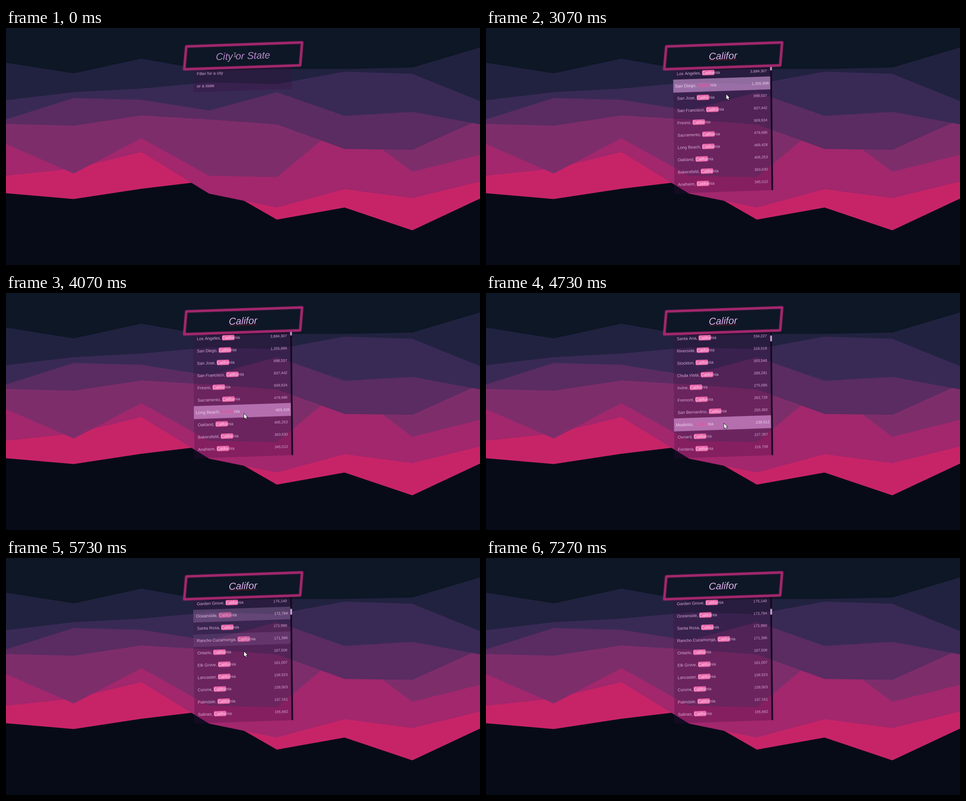
Recreate the animation shown at these times as an HTML page with a canvas. Size 1057 by 530 pixels, loop 7390 ms.

```html
<!DOCTYPE html>
<html lang="en">
<head>
<meta charset="utf-8">
<title>City search</title>
<style>
html, body { margin: 0; width: 100%; height: 100%; overflow: hidden; background: #070b18; }
canvas { display: block; }
</style>
</head>
<body>
<canvas id="stage" width="1057" height="530"></canvas>
<script>
const ctx = document.getElementById('stage').getContext('2d');
const W = 1057, LOOP = 7390, STEP = 1000 / 15;
const SANS = '"Liberation Sans", Arial, sans-serif';
const ROW = 27.5, LIST_W = 220, LIST_H = 281, SLOPE = -0.034;

const clamp = x => Math.min(1, Math.max(0, x));
const smooth = x => x * x * (3 - 2 * x);
const lerp = (a, b, k) => a + (b - a) * k;

// Lower edge of each band at equal distances, back to front
const bands = {
  '#c72467': [369, 382, 359, 341, 428, 401, 452, 381],
  '#a2276d': [330, 314, 277, 370, 401, 360, 380, 343],
  '#7e2d6b': [259, 325, 246, 330, 333, 208, 321, 283],
  '#5a2c61': [214, 218, 195, 204, 215, 270, 272, 204],
  '#392a55': [204, 156, 160, 184, 143, 196, 187, 215],
  '#212240': [161, 143, 135, 121, 125, 97, 102, 163],
  '#0d1725': [77, 101, 68, 95, 91, 91, 88, 43]
};

const others = `Chicago, Illinois|2,718,782
Jacksonville, Florida|842,583
Columbus, Ohio|822,553
Charlotte, North Carolina|792,862
Detroit, Michigan|688,701
Washington, District of Columbia|646,449
Raleigh, North Carolina|431,746`.split('\n');
const largest = `Los Angeles|3,884,307
San Diego|1,355,896
San Jose|998,537
San Francisco|837,442
Fresno|509,924
Sacramento|479,686
Long Beach|469,428
Oakland|406,253
Bakersfield|363,630
Anaheim|345,012`.split('\n');
const middle = ('Santa Ana,Riverside,Stockton,Chula Vista,Irvine,Fremont,San Bernardino,Modesto,' +
  'Oxnard,Fontana,Moreno Valley,Huntington Beach,Glendale,Santa Clarita').split(',')
  .map((name, i) => `${name}|${Math.round(334227 * 0.953 ** i).toLocaleString('en-US')}`);
const smaller = `Garden Grove|175,140
Oceanside|172,794
Santa Rosa|171,990
Rancho Cucamonga|171,386
Ontario|167,500
Elk Grove|161,007
Lancaster|159,523
Corona|159,503
Palmdale|157,161
Salinas|155,662`.split('\n');

const count = s => +s.replace(/,/g, '');
const cities = [...largest, ...middle, ...smaller]
  .map(s => s.replace('|', ', California|'))
  .concat(others)
  .map(s => s.split('|'))
  .sort((a, b) => count(b[1]) - count(a[1]));

// Matches are shown in the letter case that was typed
function search(word, total) {
  const re = new RegExp(word, 'i');
  const rows = cities.filter(c => re.test(c[0])).map(([name, pop]) => ({
    parts: name.split(new RegExp(`(${word})`, 'gi')).map((s, i) => i % 2 ? word : s), pop
  }));
  return { rows, total };
}
const hint = { rows: [{ parts: ['Filter for a city'] }, { parts: ['or a state'] }], total: 2 };
const lists = [[0, hint], [15, search('C', 480)], [20, search('Ca', 300)], [36, search('Califor', 212)]];
const keyTicks = [9, 15, 20, 22, 24, 26, 31];
const typedAt = f => 'Califor'.slice(0, keyTicks.filter(k => k <= f).length);

// Pointer stops: ms, x, y
const stops = [
  [2330, 510, 60], [2870, 537, 120], [3570, 531, 270], [4070, 531, 270], [4330, 531, 292],
  [4880, 531, 292], [5480, 531, 126], [5800, 531, 220], [6130, 525, 240], [6940, 5, 522]
];

function pointer(f) {
  const t = Math.max(f * STEP, stops[0][0]);
  const i = stops.findIndex(s => s[0] >= t);
  if (i < 0) return [-50, 600];
  const [t0, x0, y0] = stops[Math.max(0, i - 1)], [t1, x1, y1] = stops[i];
  const k = t1 > t0 ? smooth((t - t0) / (t1 - t0)) : 0;
  return [lerp(x0, x1, k), lerp(y0, y1, k)];
}

function rowUnder(f) {
  const [x, y] = pointer(f);
  const v = y - 89 - SLOPE * (x - 417), u = x - 417 - 0.0105 * v;
  return y > 89 && u > 0 && u < 217 && v < LIST_H ? Math.floor(v / ROW) : -1;
}

// Hover strength of a row, one tick behind the pointer
function hover(row, f) {
  let h = 0;
  for (let i = 36; i < f; i++) h = clamp(h + (rowUnder(i) === row ? STEP / 220 : -STEP / 300));
  return smooth(h);
}

const mix = (a, b, k) => `rgb(${a.map((v, i) => Math.round(lerp(v, b[i], k)))})`;

function poly(points) {
  ctx.beginPath();
  points.forEach(([x, y]) => ctx.lineTo(x, y));
  ctx.closePath();
}

function roundBox(x, y, w, h, r) {
  ctx.beginPath();
  ctx.roundRect(x, y, w, h, r);
  ctx.fill();
}

function drawHills() {
  ctx.fillStyle = '#070b18';
  ctx.fillRect(0, 0, W, 530);
  for (const [color, ys] of Object.entries(bands)) {
    poly([[0, 0], ...ys.map((y, i) => [i * W / 7, y + 0.5]), [W, 0]]);
    ctx.fillStyle = color;
    ctx.fill();
  }
}

function drawRow(row, i, h) {
  const top = i * ROW, grow = h * 0.9;
  ctx.fillStyle = `rgba(57,14,61,${0.28 * (1 - h)})`;
  ctx.fillRect(0, top, LIST_W, ROW);
  ctx.fillStyle = `rgba(218,155,220,${0.6 * h})`;
  ctx.fillRect(0, top - grow, 217, ROW + 2 * grow);

  ctx.save();
  ctx.translate(108.5, top + ROW / 2);
  ctx.scale(1 + 0.043 * h, 1 + 0.043 * h);
  const ink = mix([215, 167, 211], [236, 210, 236], h);
  let x = -100.2;
  ctx.font = `9.35px ${SANS}`;
  row.parts.forEach((s, n) => {
    const w = ctx.measureText(s).width;
    if (n % 2) {
      ctx.fillStyle = `rgba(234,102,171,${1 - 0.85 * h})`;
      roundBox(x - 0.2, -6.2, w + 0.6, 11.8, 2.5);
    }
    ctx.fillStyle = n % 2 ? mix([252, 215, 237], [226, 82, 160], h) : ink;
    ctx.fillText(s, x, 3.2);
    x += w;
  });
  if (row.pop) {
    ctx.font = `8.3px ${SANS}`;
    ctx.textAlign = 'right';
    ctx.fillStyle = ink;
    ctx.fillText(row.pop, 100.6, 3);
  }
  ctx.restore();
}

function drawList(f) {
  const { rows, total } = lists.filter(l => l[0] <= f).pop()[1];
  const first = 2 * Math.round(12 * clamp((f - 68) / 7));
  ctx.save();
  ctx.transform(1, SLOPE, 0.0105, 1, 417, 89);
  ctx.beginPath();
  ctx.rect(0, -4, LIST_W + 1, LIST_H + 4);
  ctx.clip();
  for (let i = 0; i < Math.min(11, total); i++)
    drawRow(rows[first + i] || { parts: [] }, i, hover(i, f));
  if (total > 10) {
    ctx.fillStyle = 'rgba(22,8,32,.92)';
    ctx.fillRect(216.5, 0, 4, LIST_H);
    ctx.fillStyle = '#c79bcb';
    const size = Math.max(9, LIST_H * LIST_H / (ROW * total));
    roundBox(216.5, first / total * LIST_H, 4, size, 1.8);
  }
  ctx.restore();
}

function drawInput(f) {
  const word = typedAt(f);
  poly([[402, 41.2], [660.3, 32.3], [656, 83.5], [397.5, 92.3]]);
  ctx.fillStyle = '#0d1725';
  ctx.fill();
  ctx.save();
  ctx.shadowColor = 'rgba(162,39,109,.35)';
  ctx.shadowBlur = 4;
  ctx.strokeStyle = '#a2276d';
  ctx.lineWidth = 5.5;
  ctx.lineJoin = 'round';
  ctx.stroke();
  ctx.restore();

  ctx.save();
  ctx.transform(1, SLOPE, 0, 1, 528.5, 62);
  ctx.font = `italic 22px ${SANS}`;
  ctx.textAlign = 'center';
  ctx.fillStyle = word ? '#dfb0ec' : '#b788ca';
  ctx.fillText(word || 'City or State', 0, 7.8);
  if (!word && f >= 5) {
    ctx.fillStyle = '#05080f';
    ctx.fillRect(0, -11, 1, 22);
  }
  if (f >= 36 && f < 109) {
    ctx.beginPath();
    for (let x = -31; x <= 32; x += 0.5) ctx.lineTo(x, 10 + 0.8 * Math.sin(x * Math.PI / 2));
    ctx.strokeStyle = '#a81420';
    ctx.lineWidth = 0.9;
    ctx.stroke();
  }
  ctx.restore();
}

function drawPointer(f) {
  const [x, y] = pointer(f);
  ctx.save();
  ctx.translate(x, y);
  if (y < 87) {
    ctx.fillStyle = '#c9c6d2';
    ctx.fillRect(0, -4, 1, 8);
    for (const v of [-5, 4]) {
      ctx.fillRect(-2, v, 2, 1);
      ctx.fillRect(1, v, 2, 1);
    }
  } else {
    poly([[0, 0], [0, 10.4], [2.4, 8.2], [4, 11.8], [5.6, 11], [4.1, 7.6], [7.3, 7.4]]);
    ctx.lineWidth = 1.4;
    ctx.strokeStyle = '#0a0610';
    ctx.stroke();
    ctx.fillStyle = '#fff';
    ctx.fill();
  }
  ctx.restore();
}

function draw(now) {
  const f = Math.floor((now % LOOP + 5) / STEP);
  drawHills();
  drawList(f);
  drawInput(f);
  drawPointer(f);
}

const start = performance.now();
function tick() {
  draw(performance.now() - start);
  requestAnimationFrame(tick);
}
tick();
</script>
</body>
</html>
```
